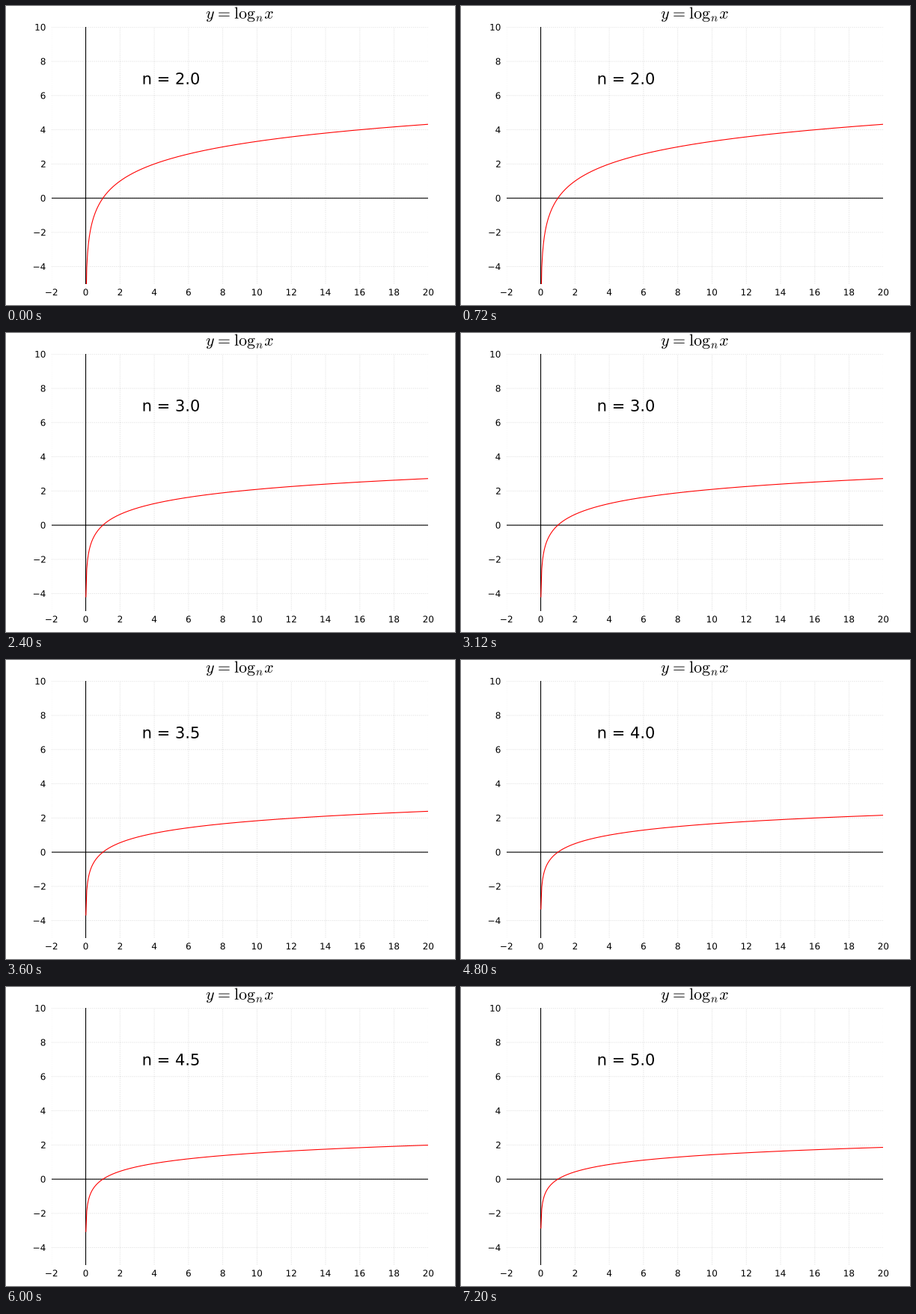
Animation of 600x400 px, one loop 8000 ms. Source, as a matplotlib script:

```python
import numpy as np
import matplotlib.pyplot as plt
from matplotlib.animation import FuncAnimation
from matplotlib.patches import PathPatch
from matplotlib.textpath import TextPath
from matplotlib.transforms import Affine2D

W, H, DPI = 600, 400, 100
PX = 72 / DPI                      # one pixel in points
LEFT, RIGHT, TOP, BOTTOM = 60.75, 564.4, 28.3, 371.5
XMIN, XMAX, YMIN, YMAX = -2, 20, -5, 10
FRAMES, INTERVAL, HOLD = 20, 400, 3

plt.rcParams["font.family"] = "DejaVu Sans"
plt.rcParams["mathtext.fontset"] = "cm"

fig = plt.figure(figsize=(W / DPI, H / DPI), dpi=DPI, facecolor="white")
ax = fig.add_axes([LEFT / W, 1 - BOTTOM / H, (RIGHT - LEFT) / W, (BOTTOM - TOP) / H])
ax.set_xlim(XMIN, XMAX)
ax.set_ylim(YMIN, YMAX)
ax.axis("off")
pixels = Affine2D().scale(1 / W, 1 / H) + fig.transFigure


def px(x):
    return LEFT + (x - XMIN) / (XMAX - XMIN) * (RIGHT - LEFT)


def py(y):
    return BOTTOM - (y - YMIN) / (YMAX - YMIN) * (BOTTOM - TOP)


def text_path(x, y, text, size, align):
    """Glyph outlines with the ink aligned at x and the baseline at y."""
    path = TextPath((0, 0), text, size=size)
    box = path.get_extents()
    anchor = box.x0 + align * box.width
    return Affine2D().translate(x - anchor, H - y).transform_path(path)


def label(x, y, text, size, align=0.5):
    patch = PathPatch(text_path(x, y, text, size, align),
                      fc="black", lw=0, transform=pixels)
    return fig.add_artist(patch)


def number(v):
    return str(v).replace("-", "\u2212")


grid = dict(color="black", alpha=0.12, lw=0.9 * PX, ls=(0, (1.5, 1.5)),
            snap=False, zorder=1)
axis = dict(color="black", lw=1.1 * PX, snap=False, zorder=2)

for x in range(-2, 21, 2):
    ax.axvline(x, **grid)
    label(px(x), 387.2, number(x), 12)

for y in range(-4, 11, 2):
    ax.axhline(y, **grid)
    label(52.6, py(y) + 4.4, number(y), 12, 1)

ax.axhline(0, **axis)
ax.axvline(0, **axis)

label(312.2, 16.8, r"$y\hspace{0.07}=\hspace{0.07}\mathrm{log}_n\hspace{0.04}x$", 21.8)

caption_spot = (183.6, 104.6)
caption = label(*caption_spot, "n = 2.0", 21, 0)

xs = np.arange(0.01, 20, 0.05)
curve, = ax.plot([], [], color="red", lw=1.1 * PX, zorder=3)


def draw(i):
    n = 2 + 0.5 * (i // HOLD)
    curve.set_data(xs, np.log(xs) / np.log(n))
    caption.set_path(text_path(*caption_spot, f"n = {n:.1f}", 21, 0))
    return curve, caption


anim = FuncAnimation(fig, draw, frames=FRAMES, interval=INTERVAL,
                     repeat=True, repeat_delay=0, blit=False)
plt.show()
```
